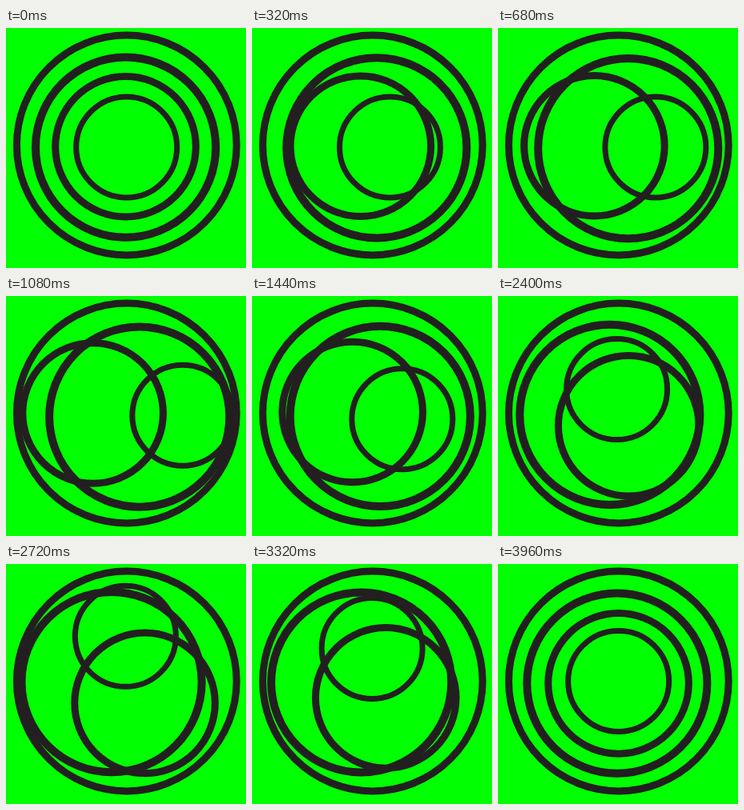
An HTML page with a canvas that plays this animation: 300 px wide and 300 px high, repeating every 4000 ms.

```html
<!DOCTYPE html>
<html lang="en">
<head>
<meta charset="utf-8">
<title>Rings</title>
<style>
  html, body { margin: 0; width: 100%; height: 100%; overflow: hidden; background: #0f0; }
  canvas { display: block; width: 300px; height: 300px; }
</style>
</head>
<body>
<canvas id="stage" width="300" height="300"></canvas>
<script>
const ctx = document.getElementById('stage').getContext('2d');
const LOOP = 4000;
const STEP = 40;
const HOME = { x: 0, y: 0 };

const at = (x, y) => ({ x, y });
const mix = (a, b, k) => at(a.x + (b.x - a.x) * k, a.y + (b.y - a.y) * k);

// Inside to outside. A moving ring swings out, passes near home,
// swings to its second side and returns; the outermost stays put.
const rings = [
  { home: at(150.7, 149), width: 7, swings: [at(72, 0), at(-3.3, 10.2), at(-1, -71.8)] },
  { home: at(149.5, 148.2), width: 9, swings: [at(-43.7, -1.5), at(-3.1, -5), at(29.2, 31.5)] },
  { home: at(149.6, 149.2), width: 10, swings: [at(18.9, 2), at(2.8, 0.5), at(-21.4, -2)] },
  { home: at(150.8, 146.5), width: 9, swings: [HOME, HOME, HOME] }
];

const radius = i => 63 + 24.8 * i;

// Smaller rings travel further and turn a little later.
const turnTimes = i => [0, 1060 - 40 * i, 1880, 2880, LOOP];

function offset(i, t) {
  const times = turnTimes(i);
  const stops = [HOME, ...rings[i].swings, HOME];
  const n = times.findIndex(time => time > t);
  const k = (t - times[n - 1]) / (times[n] - times[n - 1]);
  return mix(stops[n - 1], stops[n], k);
}

function draw(t) {
  ctx.fillStyle = '#00ff00';
  ctx.fillRect(0, 0, 300, 300);
  ctx.strokeStyle = '#231f20';
  rings.forEach(({ home, width }, i) => {
    const move = offset(i, t);
    ctx.lineWidth = width;
    ctx.beginPath();
    ctx.arc(home.x + move.x, home.y + move.y, radius(i), 0, Math.PI * 2);
    ctx.stroke();
  });
}

const start = performance.now();

function tick() {
  const t = (performance.now() - start) % LOOP;
  draw(Math.floor(t / STEP) * STEP);
  requestAnimationFrame(tick);
}

tick();
</script>
</body>
</html>
```
